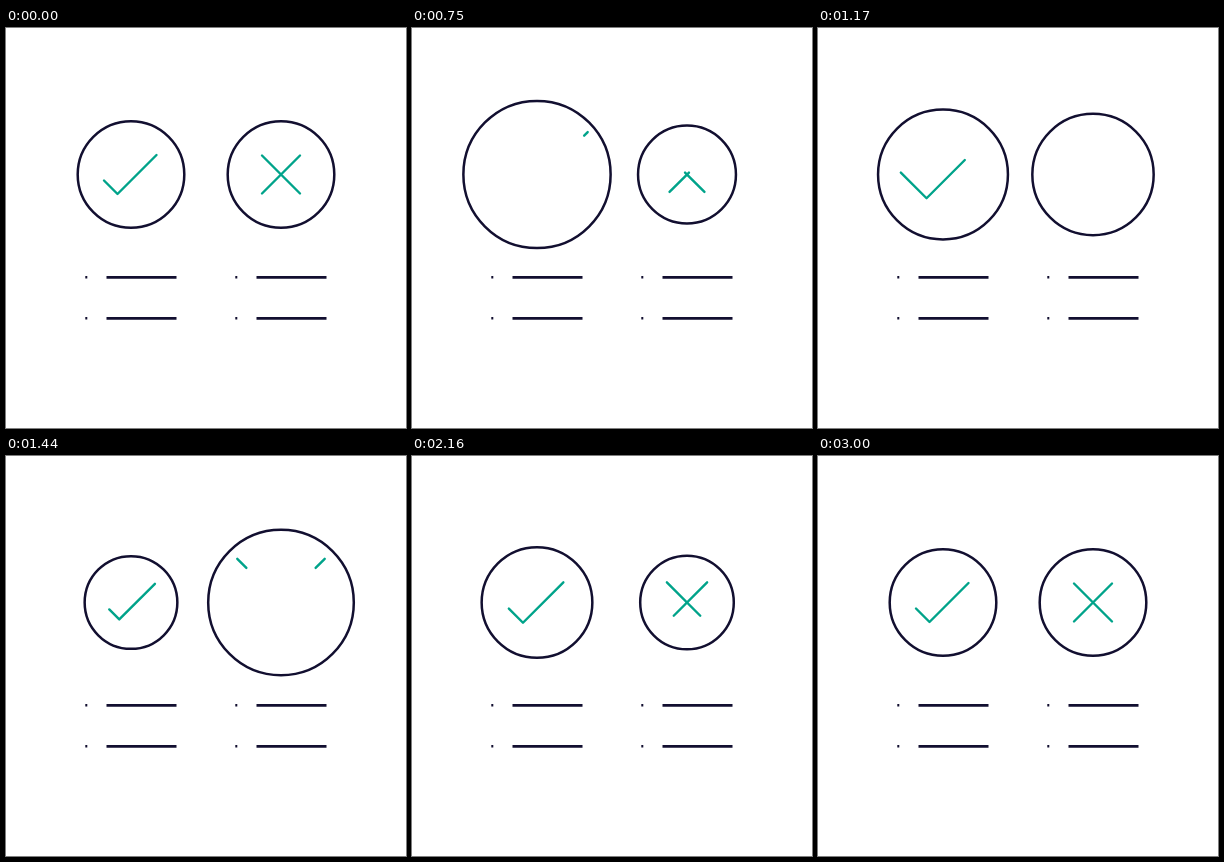
An HTML page that plays this animation: 400 by 400 pixels, repeating every 5090 ms.

```html
<!DOCTYPE html>
<html lang="en">
<head>
<meta charset="utf-8">
<title>Pros and cons</title>
<style>
  html, body { margin: 0; height: 100%; overflow: hidden; background: #fff; }
  svg { display: block; width: 100%; height: 100%; fill: none; }
  .ink { stroke: #120f30; stroke-width: 2.5; }
  .mark { stroke: #00a38a; stroke-width: 2.4; stroke-linecap: round; stroke-linejoin: round; }
</style>
</head>
<body>
<svg viewBox="0 0 400 400">
  <g class="ink">
    <circle id="yesRing" cx="125" cy="146.5"/>
    <circle id="noRing" cx="275" cy="146.5"/>
    <path stroke-width="2.8" d="M100.5 249.3h70M100.5 290.3h70M250.5 249.3h70M250.5 290.3h70"/>
    <path d="M79.3 249.3h2M79.3 290.3h2M229.3 249.3h2M229.3 290.3h2"/>
  </g>
  <path id="check" class="mark"/>
  <path id="cross" class="mark"/>
</svg>
<script>
const LOOP = 5090, MOTION_END = 3000, STEP = 30, REST = 53.3, CENTER_Y = 146.5;
const byId = id => document.getElementById(id);

// Each key is [time in ms, value]; values between keys follow a sine ease.
const yesRadius = [[0, REST], [200, 48], [920, 77.5], [1500, 45.5], [1950, 57], [2400, REST]];
const noRadius = [[600, REST], [800, 48.2], [1565, 74.5], [2110, 46.5], [2580, 57.2], [3000, REST]];

// Marks first withdraw towards their start, then slide back in from the far end.
const checkMotion = {
  tail: -13.5, tip: 39, end: 50.2, start: -26, switchAt: 600,
  leave: [[0, 0], [400, -54]],
  enter: [[675, 66], [1130, -8], [1440, 2], [1830, -1], [2250, 0]]
};
const crossMotion = {
  tail: -19, tip: 19, end: 32, start: -33, switchAt: 1200,
  leave: [[570, 0], [970, -40]],
  enter: [[1350, 52], [1800, -28], [2130, 4], [2550, -3.3], [3000, 0]]
};

function valueAt(keys, t) {
  if (t <= keys[0][0]) return keys[0][1];
  for (let i = 1; i < keys.length; i++) {
    const [t0, a] = keys[i - 1], [t1, b] = keys[i];
    if (t < t1) return a + (b - a) * (1 - Math.cos(Math.PI * (t - t0) / (t1 - t0))) / 2;
  }
  return keys[keys.length - 1][1];
}

// Visible stretch of a mark, measured along its track.
function span(m, t) {
  const leaving = t < m.switchAt;
  const shift = valueAt(leaving ? m.leave : m.enter, t);
  return [Math.max(m.tail + shift, leaving ? m.tail : m.start), Math.min(m.tip + shift, m.end)];
}

const line = (points, cx, scale) => 'M' + points
  .map(([x, y]) => `${cx + x * scale} ${CENTER_Y + y * scale}`).join('L');

function checkPath([from, to], scale) {
  if (to <= from) return '';
  const stops = from < 0 && to > 0 ? [from, 0, to] : [from, to];
  return line(stops.map(u => [u - 13.5, 19.5 - Math.abs(u)]), 125, scale);
}

function crossPath([from, to], scale) {
  if (to <= from) return '';
  return [1, -1].map(side => line([from, to].map(u => [u * side, -u]), 275, scale)).join('');
}

function draw(now) {
  const t = Math.min(Math.floor(now % LOOP / STEP) * STEP, MOTION_END);
  const yes = valueAt(yesRadius, t), no = valueAt(noRadius, t);
  byId('yesRing').setAttribute('r', yes);
  byId('noRing').setAttribute('r', no);
  byId('check').setAttribute('d', checkPath(span(checkMotion, t), yes / REST));
  byId('cross').setAttribute('d', crossPath(span(crossMotion, t), no / REST));
}

const started = performance.now();
function tick() {
  draw(performance.now() - started);
  requestAnimationFrame(tick);
}
tick();
</script>
</body>
</html>
```
